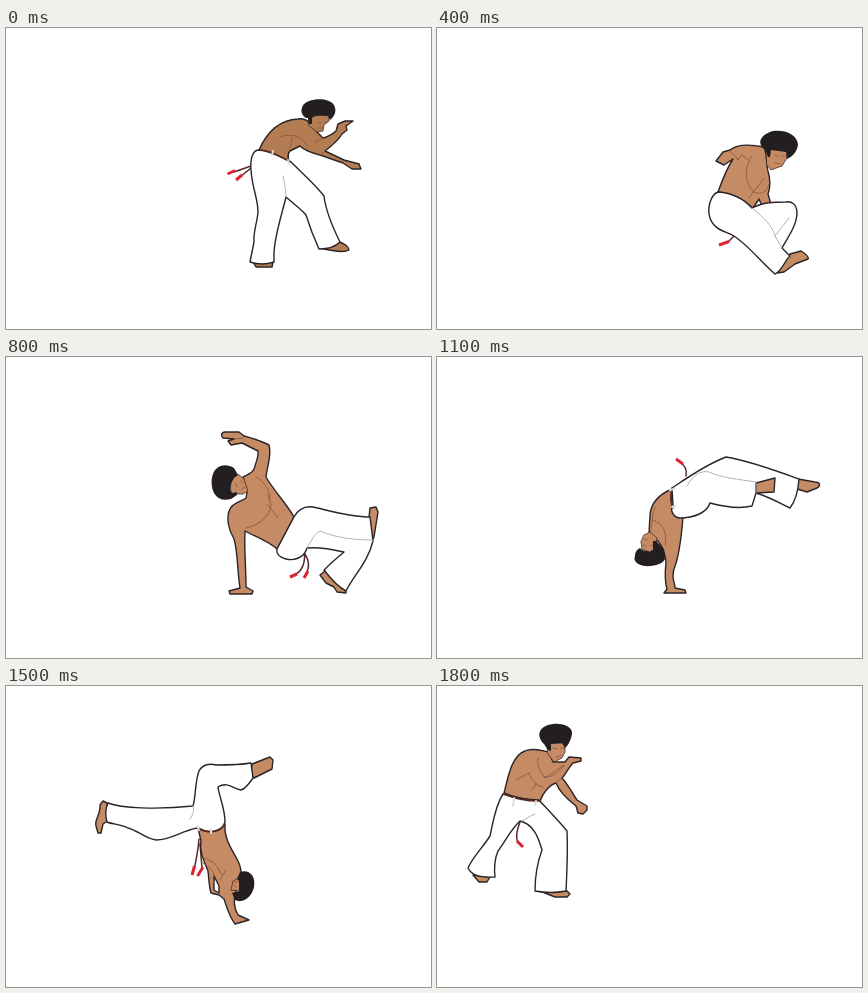
An HTML page that plays this animation: 425x301 px, repeating every 2300 ms.

```html
<!DOCTYPE html>
<html lang="en">
<head>
<meta charset="utf-8">
<title>Capoeira cartwheel</title>
<style>
html, body { margin: 0; width: 100%; height: 100%; overflow: hidden; background: #fff; }
svg { display: block; width: 100%; height: 100%; }
path { stroke-linejoin: round; stroke-linecap: round; }
.s, .w { stroke: #2b2426; stroke-width: 1.4; }
.s { fill: #c48b65; }
.dark .s { fill: #b47c52; }
.w { fill: #fff; }
.h { fill: #231f20; }
.f { fill: #c48b65; stroke: #4a3024; stroke-width: .8; }
.dark .f { fill: #b47c52; }
.l, .g, .b, .c, .r { fill: none; }
.l { stroke: #85573a; stroke-width: .8; }
.g { stroke: #aaa; stroke-width: .9; }
.b { stroke: #5c2a24; stroke-width: 1.5; }
.c { stroke: #55262a; stroke-width: 1.5; }
.r { stroke: #dc2430; stroke-width: 3; stroke-linecap: butt; }
.o { fill: none; stroke: #ddd; stroke-width: 2; }

/* Each pose is visible for its hold time, starting at --t */
.pose {
  visibility: hidden;
  animation: hold1 2300ms step-end infinite;
  animation-delay: calc(var(--t) * 1ms - 2300ms);
}
.two { animation-name: hold2; }
.five { animation-name: hold5; }
@keyframes hold1 { 0% { visibility: visible; } 4.347%, 100% { visibility: hidden; } }
@keyframes hold2 { 0% { visibility: visible; } 8.695%, 100% { visibility: hidden; } }
@keyframes hold5 { 0% { visibility: visible; } 21.739%, 100% { visibility: hidden; } }
</style>
</head>
<body>
<svg viewBox="0 0 425 301">

<!-- ginga stance -->
<g class="pose two dark" style="--t:0">
  <g id="stance">
    <path class="c" d="M245 138L228 144M245 140L234 149"/>
    <path class="r" d="M221.500 146L229 142.500M230 152L236 147"/>
    <path class="s" d="M253 122C260 106 272 92 292 91C298 90 303 93 306 98L311 104L317 110C322 109 328 105 330 103L332 96L339 93L347 93L340 98L341 102L336 106C332 113 324 119 319 123L338 132L353 136L355 141L346 141L337 135L314 127C306 125 298 122 294 118L284 123C281 126 282 130 283 134C272 130 263 124 253 122Z"/>
    <path class="l" d="M274 109C282 106 290 107 296 111L302 119M286 109L284 120M317 110L308 115M314 127L319 123"/>
    <path class="f" d="M303 87L323 87L323 93L318 97L317 103L311 104L303 98Z"/>
    <path class="l" d="M311 94L315 95M318 94L321 94M313 100L317 100"/>
    <path class="h" d="M300 90C293 86 294 76 303 73C312 70 324 71 328 77C331 83 329 88 324 92L322 88C315 87 308 87 306 90L306 96L303 96L302 90Z"/>
  </g>
  <path class="s" d="M247 234L267 234L266 239L250 239Z"/>
  <path id="foot" class="s" d="M314 220L333 214C338 215 343 219 343 222C338 225 326 223 314 220Z"/>
  <path class="w" d="M253 122C247 122 244 130 245 142C246 160 252 170 252 184C251 196 247 204 248 214L244 234Q256 238 268 234L268 226C268 210 276 186 280 169C288 176 296 182 300 187C304 200 308 210 313 221C320 221 329 219 334 214C327 200 320 185 318 168C309 156 296 145 285 134C276 130 266 123 253 122Z"/>
  <path class="g" d="M277 148C279 158 280 164 280 169"/>
  <path class="b" d="M254 122C266 123 275 129 283 133"/>
  <path class="o" d="M267 123L266 127M282 132L283 136"/>
</g>

<!-- bending the knees -->
<g class="pose two dark" style="--t:200">
  <use href="#stance" x="22" y="8"/>
  <path class="s" d="M250 234L271 234L270 240L252 240Z"/>
  <use href="#foot"/>
  <path class="w" d="M275 130C267 131 264 140 264 150C262 166 262 176 259 188C254 202 251 218 248 234L272 236C274 218 282 198 290 182C300 186 310 189 318 192C315 202 313 212 313 221C320 221 329 219 334 214C336 202 340 188 340 178C332 162 320 150 306 142C298 138 288 132 275 130Z"/>
  <path class="g" d="M296 160C292 170 291 176 290 182"/>
</g>

<!-- crouch -->
<g class="pose two" style="--t:400">
  <path class="c" d="M297 208L290 215"/>
  <path class="r" d="M282 217L292 213.500"/>
  <path class="s" d="M281 164C286 150 290 140 296 131L287 137L279 133L286 124L293 122C299 117 312 116 327 119C330 125 329 135 331 143C333 150 334 158 331 166L334 176L325 178L322 171L316 180C306 172 295 165 281 164Z"/>
  <path class="l" d="M293 123L302 132M300 132L305 127L313 133M315 128C307 140 307 154 317 164M327 150C322 158 316 163 312 170M317 164C325 168 331 162 332 156"/>
  <path class="f" d="M329 120L350 123L350 130L345 138L342 139L334 142L330 137Z"/>
  <path class="l" d="M338 127L342 129M345 128L348 128M338 135L343 136"/>
  <path class="h" d="M328 122C320 116 322 107 336 103C350 101 361 108 361 117C360 124 355 129 350 131L349 124L334 122L333 129L331 129Z"/>
  <path class="s" d="M340 245C346 240 348 230 353 226L364 223C369 226 372 229 371 231L358 236L347 244Z"/>
  <path class="w" d="M281 164C273 167 270 181 273 190C277 202 288 203 297 208C311 217 325 235 338 246C345 243 348 232 353 228L345 220C352 208 360 196 360 185C360 176 354 173 349 174C338 174 326 174 315 180C306 170 295 165 281 164Z"/>
  <path class="g" d="M315 180C326 189 336 198 338 208L345 220M338 208L352 190"/>
</g>

<!-- hand down, leg kicking out -->
<g class="pose two" style="--t:600">
  <path class="c" d="M300 198C300 206 296 211 291 214"/>
  <path class="r" d="M285 217L292 213"/>
  <path class="s" d="M300 150C294 146 288 144 284 142C290 134 290 126 286 121L270 112L274 107L288 110C300 114 301 130 298 142L302 152L288 192C276 191 266 190 256 184C250 196 245 212 242 230L246 234L246 237L224 237L224 234L235 230C238 210 237 190 240 172C240 160 246 150 256 146Z"/>
  <path class="l" d="M258 183C272 180 280 170 282 158"/>
  <use href="#head" x="28" y="10"/>
  <path class="s" d="M392 153L408 148L416 150L417 156L408 162L395 173Z"/>
  <path class="s" d="M320 226L312 232L318 237L338 237L340 233Z"/>
  <path class="w" d="M300 150C312 146 325 148 340 152C358 156 375 156 392 153L395 174C372 182 350 184 336 186C345 196 352 204 350 214L340 234L320 226C322 214 318 206 306 200C296 202 288 198 288 192Z"/>
  <path class="g" d="M306 198C312 184 322 180 336 186"/>
</g>

<!-- one-handed bridge -->
<g class="pose two" style="--t:800">
  <path class="c" d="M298 195C300 205 296 215 288 218M299 197C304 205 303 212 300 217"/>
  <path class="r" d="M284 220L291 217M298 221L302 214"/>
  <path class="s" d="M237 120C240 118 246 117 248 112C250 106 253 98 252 94L236 86L225 88L222 84L228 82L217 81C214 78 216 75 219 75L233 75L238 79C246 81 255 84 263 88C266 98 261 110 260 120C268 134 280 146 288 160L271 192C262 184 250 180 239 174C238 190 240 210 240 230L247 234L246 237L224 237L223 234L234 231C231 212 232 195 228 182C222 172 220 160 224 152C226 146 236 144 240 141L241 135Z"/>
  <path class="l" d="M240 171C255 168 264 158 265 148L262 138M250 120C258 124 264 133 264 142M261 147L272 161M229 82L237 81"/>
  <g id="head">
    <path class="f" d="M224 124L232 117L238 122L242 134L237 137L226 137Z"/>
    <path class="l" d="M230 127L231 130M235 124L237 126M236 132L239 130"/>
    <path class="h" d="M225 142C207 147 203 128 207 117C210 108 220 106 228 111L232 118L228 121C225 126 223 132 226 136L231 135L231 138Z"/>
  </g>
  <path class="s" d="M363 160L364 151L370 150L372 155L368 180L366 184Z"/>
  <path class="s" d="M319 214L314 218L320 226L328 230L331 235L340 236L339 232Z"/>
  <path class="w" d="M288 160C293 151 300 149 307 150C325 154 345 160 364 160L367 184C362 205 348 218 340 234C332 230 325 222 318 213C324 207 332 200 338 195C325 192 312 190 301 191C298 201 288 204 280 202C272 200 270 195 271 192Z"/>
  <path class="g" d="M301 191C305 184 309 176 314 174C330 181 350 183 367 183"/>
</g>

<!-- hips rising -->
<g class="pose" style="--t:1000">
  <path class="c" d="M268 123C268 116 264 112 259 111"/>
  <path class="r" d="M253 109L260 112"/>
  <path class="s" d="M262 128C248 130 232 140 224 150C217 160 218 170 224 180C230 196 231 214 232 231L225 234L225 237L248 237L247 233L239 231C238 214 239 198 243 184C252 180 260 174 266 166Z"/>
  <path class="l" d="M228 160C240 164 246 172 243 184"/>
  <path class="f" d="M207 164L217 160L224 170L219 180L212 180Z"/>
  <path class="h" d="M196 168C192 178 198 190 210 190C216 189 220 184 220 180L213 178C207 176 205 170 207 164C202 162 198 164 196 168Z"/>
  <path class="s" d="M366 140L378 138L382 142L376 152L364 160Z"/>
  <path class="s" d="M350 180L357 186L352 200L344 208L336 201Z"/>
  <path class="w" d="M262 128C272 118 284 115 298 118C320 126 342 136 366 140L364 162C350 166 338 163 326 160C336 168 344 174 350 180L336 202C320 192 304 182 294 172C284 178 272 176 264 166Z"/>
  <path class="g" d="M326 160C310 154 296 146 286 144"/>
</g>

<!-- legs swinging over -->
<g class="pose" style="--t:1100">
  <path class="c" d="M249 119C250 112 248 109 244 106"/>
  <path class="r" d="M239 102L246 107"/>
  <path class="s" d="M235 132C223 137 214 145 213 158L212 176L221 184C226 190 228 196 229 205C228 215 228 226 230 232L227 236L249 236L248 233L238 231C238 225 234 222 237 212C242 200 244 185 246 160L235 150Z"/>
  <path class="l" d="M218 150C214 160 216 168 213 176M216 163C226 166 231 177 228 188"/>
  <g id="headdown">
    <path class="h" d="M198 199C195 206 205 210 214 209C222 208 228 205 228 201L227 192L219 184L216 185L218 191C214 195 206 195 203 191C199 193 198 196 198 199Z"/>
    <path class="f" d="M207 178L213 175L220 181L219 190L213 195L205 192L204 185Z"/>
    <path class="l" d="M206 188L209 189M213 189L216 188M207 182L210 183"/>
    <path class="h" d="M216 184L220 184L221 194L216 192Z"/>
  </g>
  <path class="s" d="M319 126L338 121L337 135L319 136Z"/>
  <path class="l" d="M334 124L333 134"/>
  <path class="s" d="M361 122L378 125C383 125 384 129 380 131L370 135L360 132Z"/>
  <path class="w" d="M235 131C250 121 268 108 289 100C310 103 340 114 362 122C361 135 357 146 353 151C343 146 330 139 319 136L315 149C303 152 288 150 273 146C270 156 256 161 243 161C235 160 233 152 236 148Z"/>
  <path class="s" d="M319 126L338 121L337 135L319 136Z"/>
  <path class="g" d="M250 129C256 118 264 113 272 115C285 121 300 122 319 125L319 136"/>
  <path class="b" d="M235 131Q232 142 236 151"/>
  <path class="o" d="M233 133L237 132M235 150L238 149"/>
</g>

<!-- handstand, legs parting -->
<g class="pose" style="--t:1200">
  <path class="c" d="M214 140C208 144 206 148 204 153"/>
  <path class="r" d="M199 158L205 152"/>
  <path class="s" d="M215 138C209 150 207 162 209 175L222 188C226 200 226 218 229 232L227 236L246 236L246 233L236 231C233 222 234 212 237 203C242 188 242 172 240 156Z"/>
  <path class="l" d="M211 168C222 172 228 182 227 194"/>
  <use href="#headdown" y="3"/>
  <path class="s" d="M290 66L304 56L310 60L308 70L299 82Z"/>
  <path class="s" d="M320 114L338 118L340 126L330 132L316 134Z"/>
  <path class="w" d="M214 138C216 122 222 108 234 98C250 88 268 76 290 66L300 84C288 94 276 100 268 106C284 108 304 110 320 114L316 136C296 138 276 138 258 132C254 146 246 156 236 157C226 157 218 150 214 138Z"/>
  <path class="g" d="M268 106C258 106 250 108 244 113"/>
</g>

<!-- handstand, knees bent -->
<g class="pose" style="--t:1300">
  <path class="c" d="M202 160L194 172M203 174L196 178"/>
  <path class="r" d="M190.500 177L196 170.500M193.500 180L202 176"/>
  <g id="tucked">
    <path class="h" d="M199 203C200 197 207 196 218 197L220 206C219 212 213 214 207 213C201 212 198 208 199 203Z"/>
    <path class="f" d="M205 180L214 184L218 196L210 200L203 196Z"/>
  </g>
  <path class="s" d="M207 136C203 148 201 160 203 172C205 183 212 190 219 203C222 215 226 226 229 232L228 237L243 236L243 233L234 231C229 224 230 215 232 207C238 196 238 182 236 172C232 163 230 156 230 151C220 152 210 146 207 136Z"/>
  <path class="l" d="M206 162C204 170 206 176 206 182M206 177C213 180 216 188 217 197M229 188L231 196"/>
  <path class="f" d="M205 182L212 187L217 197L210 200L203 196Z"/>
  <path class="l" d="M205 194L208 196M210 196L213 195"/>
  <path class="s" d="M242 74L243 60L242 47L246 46L249 57L252 70L250 73Z"/>
  <path class="s" d="M275 123L279 117L303 122C304 126 301 131 299 133L280 131Z"/>
  <path class="w" d="M207 133L209 121C200 108 188 92 186 80C188 73 194 70 203 69C215 67 228 65 241 63L240 86C246 86 250 90 256 96C263 104 272 112 279 117C276 125 264 131 257 131C251 128 247 122 243 117C244 128 245 140 239 147C230 153 216 152 211 144Z"/>
  <path class="w" d="M240 86L213 89L223 98C228 90 234 86 240 86Z"/>
  <path class="g" d="M223 98L214 121"/>
  <path class="b" d="M207 133C210 149 226 154 238 148"/>
  <path class="o" d="M206 135L209 133M214 149L217 146"/>
</g>

<!-- handstand, split -->
<g class="pose" style="--t:1400">
  <path class="c" d="M199 148C198 158 194 166 191 174M200 156L198 176"/>
  <path class="r" d="M188 180L192 172M196 183L199 175"/>
  <use href="#tucked" x="3"/>
  <path class="s" d="M200 140C197 152 197 165 201 176C206 188 212 196 216 208C220 220 224 228 229 234L229 238L243 235L233 230C228 222 229 214 232 206C238 194 237 182 234 173C229 162 225 156 225 148Z"/>
  <path class="l" d="M203 176C212 178 216 188 216 198"/>
  <path class="s" d="M146 82L132 78L126 64L131 62L140 68L154 62Z"/>
  <path class="s" d="M262 88L278 84L284 88L280 98L258 107Z"/>
  <path class="w" d="M200 140C196 126 198 112 202 104C186 100 160 92 146 82L154 62C176 66 196 72 214 78C226 76 244 82 262 88L258 108C246 114 236 112 226 108C230 122 232 136 226 148C218 154 206 150 200 140Z"/>
  <path class="g" d="M202 104C206 108 206 114 204 119"/>
</g>

<!-- front leg reaching down -->
<g class="pose" style="--t:1500">
  <path class="c" d="M193 153C192 165 190 175 188 184M194 158L196 182"/>
  <path class="r" d="M186 189L188.500 180M191.500 190L197 181"/>
  <path class="s" d="M192 142L195 155C193 165 198 175 202 185C203 194 203 200 205 207L213 209L218 213C221 222 223 230 229 238L243 234L232 229C228 222 227 214 230 205C236 195 237 185 232 175C225 162 218 152 219 139C210 148 201 146 192 142Z"/>
  <path class="w" d="M208 190L213 200L213 207L208 204Z"/>
  <path class="l" d="M196 172C205 173 212 179 215 188M197 177C204 182 209 186 208 191M220 184L214 194"/>
  <g id="headright">
    <path class="f" d="M225 204L227 195L235 191L234 204Z"/>
    <path class="l" d="M228 199L230 201M229 196L232 196"/>
    <path class="h" d="M234 186C244 183 250 191 248 201C246 211 237 218 229 214L226 207L233 205L233 195L231 193Z"/>
  </g>
  <path class="s" d="M101 117L97 115L94 119C95 128 88 134 90 140L92 147L95 147L97 138L103 134Z"/>
  <path class="s" d="M246 78L264 71L267 74L266 83L248 92L245 88Z"/>
  <path class="w" d="M102 117C115 122 150 124 187 120C190 110 189 95 193 85C196 79 203 77 210 79C222 79 233 79 245 77L247 92C243 98 239 103 235 104C227 103 222 95 212 101C213 110 219 122 219 136C216 147 203 148 191 142C175 145 165 154 150 154C138 152 133 145 122 142C115 138 105 138 101 136Q98 126 102 117Z"/>
  <path class="g" d="M187 120C189 125 186 130 184 133"/>
  <path class="b" d="M192 142C202 148 214 146 219 138"/>
  <path class="o" d="M191 140L193 144M205 143L205 147"/>
</g>

<!-- foot about to land -->
<g class="pose" style="--t:1600">
  <path class="c" d="M181 146C178 158 176 166 175 174"/>
  <path class="r" d="M173 181L175.500 172"/>
  <path class="s" d="M178 140C184 158 192 168 204 178C208 196 212 212 215 228L212 235L228 236L224 228C222 216 222 206 222 198C226 210 230 220 236 228L234 237L250 236L242 226C238 206 236 190 230 178C222 162 212 148 202 130Z"/>
  <path class="l" d="M204 178C212 176 220 182 222 196"/>
  <use href="#headright" x="5" y="-10"/>
  <path class="s" d="M76 190L70 202L76 208L96 206L98 200Z"/>
  <path class="s" d="M228 70L244 62L250 66L246 78L238 87Z"/>
  <path class="w" d="M178 144C164 150 146 160 130 166C116 176 104 188 98 200L76 190C84 172 94 156 106 144C128 130 154 118 172 108C182 92 204 78 228 70L238 88C226 96 214 102 206 108C208 118 208 126 204 134C196 142 188 146 178 144Z"/>
  <path class="g" d="M172 108C176 112 176 118 173 122"/>
</g>

<!-- coming up -->
<g class="pose" style="--t:1700">
  <path class="s" d="M98 128C104 108 118 96 136 98C146 100 152 106 156 112C162 128 170 144 172 160L180 172L176 178L168 174C162 158 152 146 146 134C140 140 136 146 134 152Z"/>
  <path class="l" d="M118 118C126 118 136 124 146 134"/>
  <use href="#headup" x="42" y="38"/>
  <path class="s" d="M40 188L34 192L40 198L56 200Z"/>
  <path class="s" d="M108 206L134 206L140 210L120 212Z"/>
  <path class="w" d="M98 128C86 138 80 152 74 164C62 174 48 182 40 188L58 200C74 194 90 186 104 174C112 178 114 184 112 192L106 206L134 207C140 192 142 172 136 152C124 146 110 140 98 128Z"/>
  <path class="g" d="M104 174C108 166 112 162 118 160"/>
  <path class="c" d="M103 174C99 180 99 184 100 189"/>
  <path class="r" d="M99 187L104 193"/>
</g>

<!-- guard -->
<g class="pose five" style="--t:1800">
  <path class="s" d="M67 107C71 92 74 70 88 65C95 61 105 65 112 66L116 76L128 76L132 71L144 72L144 75L136 77C131 82 129 88 125 92C130 97 136 108 140 114L150 120L150 124L146 128L141 127L139 120C130 113 122 105 119 97C112 99 106 107 103 115C92 114 78 112 67 107Z"/>
  <path class="l" d="M79 94L92 87C94 93 98 99 106 101M101 72C99 80 104 86 108 92L127 79M95 104L99 98M107 91C114 92 120 87 127 80M119 97L125 92"/>
  <g id="headup">
    <path class="f" d="M110 57L128 57L128 66L125 72L117 76L111 68Z"/>
    <path class="l" d="M116 62L120 63M124 62L127 62M119 71L124 70"/>
    <path class="h" d="M107 58C99 50 101 40 116 38C128 37 136 42 135 48C134 54 131 60 128 62L125 57L114 58L114 65L111 64Z"/>
  </g>
  <path class="s" d="M36 189L53 191L50 196L42 196Z"/>
  <path class="s" d="M103 205L130 205L133 208L130 211L118 211Z"/>
  <path class="w" d="M66 108C58 120 56 137 53 150C46 161 35 172 31 182C34 188 40 192 58 191C57 182 58 172 61 165C69 154 75 142 83 135C96 138 101 150 105 164C99 180 98 195 98 205Q114 208 129 205C130 185 131 165 130 145C121 134 111 124 102 114C90 114 78 112 66 108Z"/>
  <path class="g" d="M85 135C89 133 93 130 98 128"/>
  <path class="b" d="M67 108C78 113 90 115 102 115"/>
  <path class="o" d="M77 112L76 120M99 115L98 119"/>
  <path class="c" d="M83 136C79 146 79 153 81 157"/>
  <path class="r" d="M80 155L86 161"/>
</g>

</svg>
</body>
</html>
```
